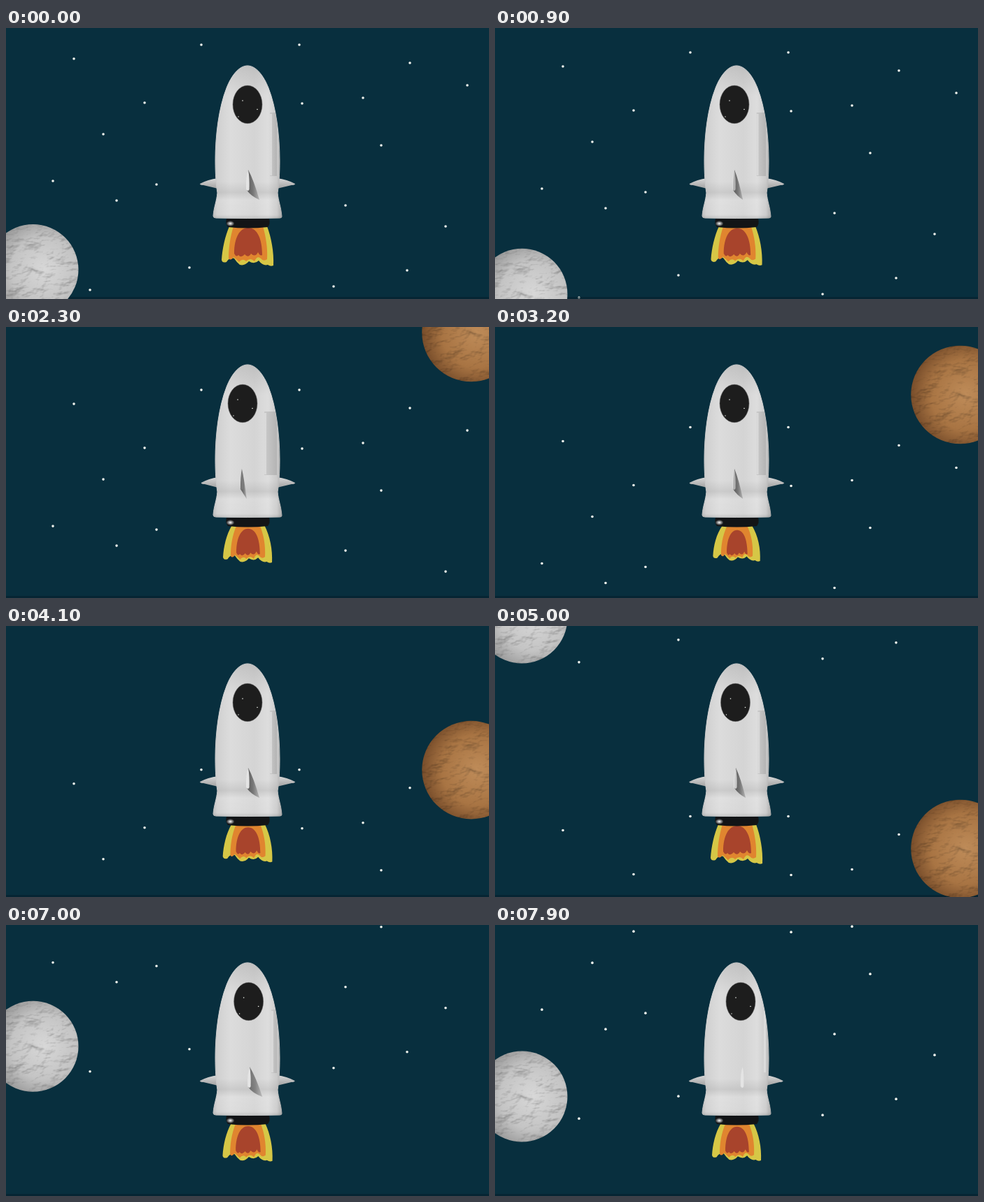
An HTML page that plays this animation: 690x388 px, repeating every 8000 ms.

```html
<!DOCTYPE html>
<html lang="en">
<head>
<meta charset="utf-8">
<title>Rocket</title>
<style>
html, body { margin: 0; width: 100%; height: 100%; overflow: hidden; background: #082f3e; }
svg { display: block; width: 100%; height: 100%; }
.star { fill: #f1f4ee; }
</style>
</head>
<body>
<svg viewBox="0 0 690 388" preserveAspectRatio="none">
  <defs>
    <linearGradient id="hull">
      <stop offset="0" stop-color="#bcbcbc"/>
      <stop offset=".06" stop-color="#d0d0d0"/>
      <stop offset=".25" stop-color="#dcdcdc"/>
      <stop offset=".6" stop-color="#d4d4d4"/>
      <stop offset=".8" stop-color="#dddddd"/>
      <stop offset=".93" stop-color="#cacaca"/>
      <stop offset="1" stop-color="#a9a9a9"/>
    </linearGradient>
    <linearGradient id="shade" x2="0" y2="1">
      <stop offset="0" stop-color="#555" stop-opacity=".16"/>
      <stop offset=".2" stop-color="#555" stop-opacity="0"/>
      <stop offset=".76" stop-color="#555" stop-opacity="0"/>
      <stop offset=".83" stop-color="#555" stop-opacity=".12"/>
      <stop offset=".88" stop-color="#fff" stop-opacity=".12"/>
      <stop offset=".97" stop-color="#fff" stop-opacity=".05"/>
      <stop offset="1" stop-color="#555" stop-opacity=".2"/>
    </linearGradient>
    <linearGradient id="panelFill">
      <stop offset="0" stop-color="#c6c6c6"/>
      <stop offset="1" stop-color="#b0b0b0"/>
    </linearGradient>
    <linearGradient id="bladeFill">
      <stop offset="0" stop-color="#4c4c4c"/>
      <stop offset=".5" stop-color="#6e6e6e"/>
      <stop offset="1" stop-color="#b0b0b0"/>
    </linearGradient>
    <linearGradient id="finFill" x2="0" y2="1">
      <stop offset="0" stop-color="#d8d8d8"/>
      <stop offset="1" stop-color="#a2a2a2"/>
    </linearGradient>
    <radialGradient id="moonFill" cx=".62" cy=".5" r=".66">
      <stop offset="0" stop-color="#d8d8d8"/>
      <stop offset=".55" stop-color="#c4c4c4"/>
      <stop offset="1" stop-color="#8a8a8a"/>
    </radialGradient>
    <radialGradient id="marsFill" cx=".56" cy=".5" r=".6">
      <stop offset="0" stop-color="#bf8c59"/>
      <stop offset=".6" stop-color="#a87443"/>
      <stop offset="1" stop-color="#6f4626"/>
    </radialGradient>
    <radialGradient id="glint">
      <stop offset="0" stop-color="#fff"/>
      <stop offset="1" stop-color="#fff" stop-opacity="0"/>
    </radialGradient>
    <filter id="rock" x="0" y="0" width="1" height="1" color-interpolation-filters="sRGB">
      <feTurbulence type="fractalNoise" baseFrequency=".035 .06" numOctaves="4" seed="7"/>
      <feDiffuseLighting surfaceScale="2" diffuseConstant="1.18" lighting-color="#fff" result="light">
        <feDistantLight azimuth="235" elevation="58"/>
      </feDiffuseLighting>
      <feComposite in="SourceGraphic" in2="light" operator="arithmetic" k1="1"/>
    </filter>
    <path id="body" d="M345 54C357 54 368 68 375 86C386 114 391 154 391 190C391 208 390 224 388 236C389 248 393 256 394 270Q394 272 391 272Q345 273 300 272Q296 272 296 269C297 256 301 248 302 236C300 224 299 208 299 190C299 154 304 114 315 86C322 68 333 54 345 54Z"/>
    <clipPath id="inHull"><use href="#body"/></clipPath>
  </defs>

  <rect width="690" height="388" fill="#082f3e"/>
  <g id="stars"></g>
  <g id="starsNext"></g>
  <rect y="385" width="690" height="3" fill="#041c28" opacity=".5"/>
  <g id="moon"><circle r="65" fill="url(#moonFill)" filter="url(#rock)"/></g>
  <g id="mars"><circle r="70.3" fill="url(#marsFill)" filter="url(#rock)"/></g>

  <g id="flame">
    <path id="yellow" fill="#d6c746"/>
    <path id="orange" fill="#e0852f"/>
    <path id="red" fill="#a8442c" d="M326 323C326 300 334 286 346 286C359 286 366 302 366 325Q363 327 360 321Q356 329 350 323Q346 330 341 324Q336 330 332 325Q329 329 326 323Z"/>
  </g>

  <path d="M315 273H376Q378 280 374 285Q345 288 317 285Q313 280 315 273Z" fill="#121416"/>
  <ellipse cx="320.5" cy="280" rx="6" ry="4" fill="url(#glint)"/>
  <path id="finL" fill="url(#finFill)"/>
  <path id="finR" fill="url(#finFill)"/>
  <use href="#body" fill="url(#hull)" stroke="url(#hull)"/>
  <use href="#body" fill="url(#shade)"/>
  <g clip-path="url(#inHull)">
    <rect id="panel" y="121" height="91" fill="url(#panelFill)"/>
    <rect id="edge" y="123" width="3" height="88" fill="#e6e6e6" opacity=".6"/>
  </g>
  <path id="blade" fill="url(#bladeFill)"/>
  <path id="face" fill="#e4e4e4"/>
  <g id="port">
    <ellipse rx="21" ry="27.2" fill="#1d1d1d" stroke="#666" stroke-width=".5"/>
    <circle class="star" cx="-7" cy="-5.5" r=".8"/>
    <circle class="star" cx="14" cy="7" r=".8"/>
    <circle class="star" cx="-13" cy="17.5" r=".7"/>
  </g>
</svg>
<script>
const LOOP = 8000, STEP = 100;
const el = id => document.getElementById(id);
const set = (id, name, value) => el(id).setAttribute(name, value);
const move = (id, x, y) => set(id, 'transform', `translate(${x} ${y})`);

const stars = [[97, 44], [279, 24], [419, 24], [577, 50], [659, 82], [198, 107], [423, 108],
  [510, 100], [139, 152], [536, 168], [67, 219], [215, 224], [158, 247], [485, 254],
  [628, 284], [262, 343], [573, 347], [120, 375], [468, 370]];
const dots = stars.map(([x, y]) => `<circle class="star" cx="${x}" cy="${y}" r="1.8"/>`).join('');
el('stars').innerHTML = el('starsNext').innerHTML = dots;

// Tracks hold [seconds, value] pairs.
const marsTrack = [[0.9, -72], [2.3, 8], [3.2, 97], [5, 319], [6, 430], [7, 512]];
const turnTrack = [[0, 345], [0.9, 342], [2.3, 338], [3.2, 342], [4.1, 345], [5, 343.5], [6, 341.5], [7.9, 351]];
const burnTrack = [[0, 1], [0.9, 0.85], [2.3, 0.4], [3.2, 0], [5, 1], [6, 0.85], [7.9, 0.4]];

function slope(keys, i) {
  if (i === 0 || i === keys.length - 1) return 0;
  const [[a, u], [b, v], [c, w]] = keys.slice(i - 1, i + 2);
  const before = (v - u) / (b - a), after = (w - v) / (c - b);
  if (before * after <= 0) return 0;
  return (before * (c - b) + after * (b - a)) / (c - a);
}

function spline(keys, t) {
  const last = keys.length - 1;
  if (t <= keys[0][0]) return keys[0][1];
  if (t >= keys[last][0]) return keys[last][1];
  const i = keys.findIndex(k => k[0] > t) - 1;
  const [a, u] = keys[i], [b, v] = keys[i + 1];
  const d = b - a, s = (t - a) / d, r = 1 - s;
  return u * r * r * (1 + 2 * s) + v * s * s * (3 - 2 * s)
    + d * s * r * (slope(keys, i) * r - slope(keys, i + 1) * s);
}

function ease(u) {
  u = Math.min(1, Math.max(0, u));
  return u * u * (3 - 2 * u);
}

function moonY(t) {
  const s = t - 6;
  return t < 3 ? 346 + 43 * t * t : 85.5 + 92.6 * s - 4.4 * s * s;
}

function drawRocket(x) {
  const turn = x - 345;
  const left = 277 + Math.max(0, -turn) / 4;
  const right = 413 - Math.max(0, turn) / 4;
  const fin = (tip, root, dir) =>
    `M${root} 215Q${tip + 11 * dir} 217 ${tip} 223Q${tip} 225 ${tip + 5 * dir} 225L${root} 230Z`;
  set('finL', 'd', fin(left, 303, 1));
  set('finR', 'd', fin(right, 387, -1));
  move('port', x, 109.5);

  const panelX = 377 + turn * 1.15;
  const shown = Math.min(1, Math.max(0, (350 - x) / 4));
  set('panel', 'x', panelX);
  set('panel', 'width', Math.max(0, 387 - panelX));
  set('panel', 'opacity', shown * 0.85);
  set('edge', 'x', panelX);

  const f = 346 + turn * 1.3;
  const reach = Math.max(4, 16 + turn * 1.3);
  set('blade', 'd', `M${f} 203Q${f + reach * 0.5} 218 ${f + reach} 246Q${f + 3} 240 ${f - 2} 232Q${f - 2} 214 ${f} 203Z`);
  set('blade', 'opacity', shown * 0.9);
  set('face', 'd', `M${f} 203Q${f - 3.5} 212 ${f - 3} 231Q${f} 235 ${f + 1.5} 231Q${f + 2} 214 ${f} 203Z`);
  set('face', 'opacity', Math.min(1, Math.max(0.15, (x - 337) / 8)));
}

// The top of the flame narrows faster than its foot.
function drawFlame(k) {
  const scale = (id, y, sx, sy) =>
    set(id, 'transform', `translate(345.5 ${y}) scale(${sx} ${sy}) translate(-345.5 ${-y})`);
  const pinch = 4 * (1 - k);
  set('yellow', 'd', `M${319 + pinch} 284C313 298 309 316 308 332Q309 337 315 335Q320 327 326 330Q330 336 334 339Q341 341 347 334Q355 339 361 333Q367 341 374 339Q378 342 382 340C383 321 379 300 ${373 - pinch} 284Z`);
  set('orange', 'd', `M${325 + pinch} 284C320 300 318 316 318 330Q321 334 325 328Q329 331 333 335Q338 329 343 334Q349 328 355 334Q359 325 364 330Q368 335 373 331C374 314 371 298 ${367 - pinch} 284Z`);
  scale('yellow', 284, 0.91 + 0.09 * k, 0.91 + 0.09 * k);
  scale('orange', 284, 0.82 + 0.18 * k, 0.93 + 0.07 * k);
  scale('red', 325, 0.74 + 0.26 * k, 0.88 + 0.12 * k);
}

function draw(t) {
  move('stars', 0, 500 * ease((t - 0.02) / 10));
  move('starsNext', 0, -563 + 637.6 * ease(t / 12));
  move('moon', 38.5, moonY(t));
  move('mars', 664.5, spline(marsTrack, t));
  drawRocket(spline(turnTrack, t));
  drawFlame(spline(burnTrack, t));
}

const start = performance.now();
function tick() {
  const ms = (performance.now() - start) % LOOP;
  draw(Math.floor(ms / STEP) * STEP / 1000);
  requestAnimationFrame(tick);
}
tick();
</script>
</body>
</html>
```
